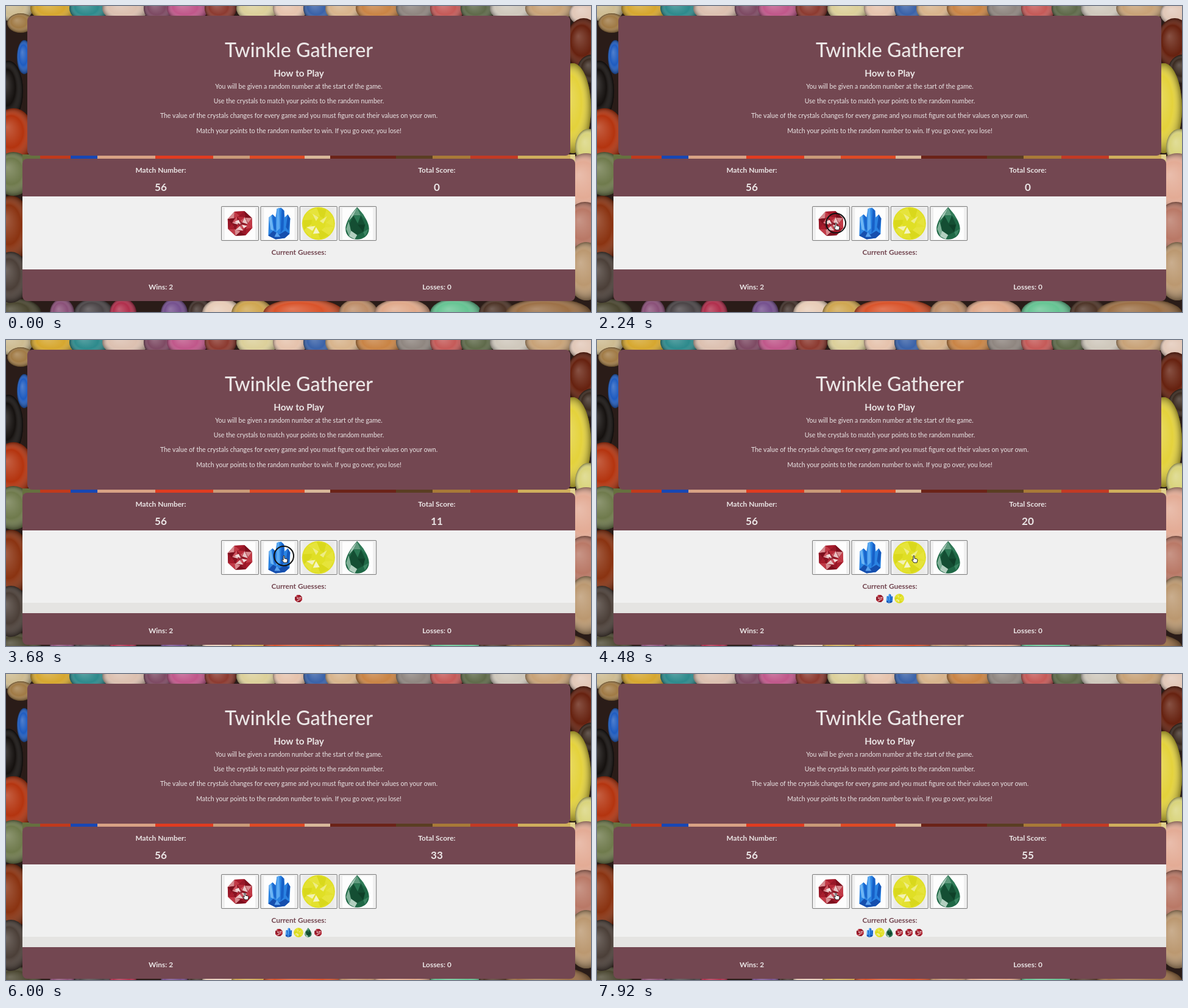
Animation, 960 px wide and 503 px high, one loop 8000 ms. Source, as an HTML page with a canvas:

```html
<!DOCTYPE html>
<html lang="en">
<head>
<meta charset="utf-8">
<title>Twinkle Gatherer</title>
<style>
html, body { margin: 0; width: 100%; height: 100%; overflow: hidden; background: #2a1c18; }
canvas { display: block; width: 960px; height: 503px; }
</style>
</head>
<body>
<canvas id="stage" width="960" height="503"></canvas>
<script>
const W = 960, H = 503, LOOP = 8000, STEP = 80;
const PLUM = '#734751', PALE = '#ebe6e6', PAPER = '#f0f0f0';
const canvas = document.getElementById('stage');
const ctx = canvas.getContext('2d');

// ---------- background of polished stones ----------
function stone(g, x, y, rx, ry, color) {
  g.save();
  g.translate(x, y);
  g.scale(rx, ry);
  g.beginPath();
  g.arc(0, 0, 1, 0, 7);
  g.fillStyle = color;
  g.fill();
  const shade = g.createRadialGradient(-0.3, -0.3, 0, 0, 0, 1);
  shade.addColorStop(0, 'rgba(255,255,255,.22)');
  shade.addColorStop(0.6, 'rgba(255,255,255,0)');
  shade.addColorStop(1, 'rgba(0,0,0,.4)');
  g.fillStyle = shade;
  g.fill();
  g.restore();
}

function makeBackdrop() {
  const c = document.createElement('canvas');
  c.width = W;
  c.height = H;
  const g = c.getContext('2d');
  g.fillStyle = '#2a1c18';
  g.fillRect(0, 0, W, H);

  const top = [
    [14, 30, '#cdbb91'], [78, 38, '#d6a72f'], [136, 32, '#2d8a8c'], [196, 38, '#dcc0b0'],
    [250, 24, '#7d4a63'], [298, 34, '#c0578a'], [352, 26, '#8c3a30'], [412, 34, '#dcd09a'],
    [466, 28, '#e6c3ad'], [512, 24, '#3a62a8'], [554, 30, '#d8b48c'], [612, 38, '#c98445'],
    [672, 32, '#8f8680'], [724, 28, '#c55a58'], [774, 28, '#5f6a4a'], [830, 36, '#cfc8bc'],
    [892, 40, '#c8a277']
  ];
  const bottom = [
    [18, 40, '#4a4630'], [92, 20, '#8a5078'], [144, 32, '#4a4446'], [192, 22, '#b02f4c'],
    [276, 22, '#75508e'], [318, 20, '#40302a'], [354, 32, '#e8cdb8'], [404, 34, '#cfa650'],
    [488, 66, '#d9532a'], [578, 32, '#bd8d68'], [650, 46, '#e0a98a'], [738, 42, '#66c493'],
    [806, 30, '#4d3427'], [890, 70, '#9c7046']
  ];
  top.forEach(([x, rx, color]) => stone(g, x, 4, rx, 22, color));
  bottom.forEach(([x, rx, color]) => stone(g, x, 505, rx, 24, color));

  // left edge
  stone(g, 24, 28, 22, 16, '#a07a45');
  stone(g, 30, 84, 12, 28, '#1f5cc0');
  stone(g, 4, 140, 24, 50, '#15110f');
  stone(g, 12, 212, 34, 44, '#b4340f');
  stone(g, 12, 276, 32, 36, '#6f7a4c');
  stone(g, 8, 366, 34, 54, '#8a3311');
  stone(g, 8, 446, 30, 42, '#4b3f38');

  // right edge
  stone(g, 950, 12, 26, 20, '#e2c8b8');
  stone(g, 948, 62, 30, 42, '#66210f');
  stone(g, 962, 104, 24, 24, '#3a2a20');
  stone(g, 930, 168, 30, 74, '#e4d23c');
  stone(g, 956, 232, 22, 30, '#d9d47c');
  stone(g, 952, 292, 40, 50, '#e3ab95');
  stone(g, 950, 364, 34, 42, '#b97866');
  stone(g, 952, 436, 32, 48, '#bb9870');

  // gap between the panels
  const gap = [
    [27, '#66703f'], [56, '#c03a1c'], [106, '#1747b4'], [150, '#d8a285'], [245, '#e03c20'],
    [340, '#c99a78'], [400, '#dd4a25'], [490, '#d8b89a'], [532, '#6b2318'], [640, '#5a3e22'],
    [700, '#a87a38'], [762, '#c23a24'], [840, '#cfae5c'], [926, '#e0cf8c']
  ];
  gap.forEach(([x, color], i) => {
    g.fillStyle = color;
    g.fillRect(x, 244, (gap[i + 1] || [934])[0] - x, 12);
  });
  return c;
}
const backdrop = makeBackdrop();

// ---------- drawing helpers ----------
function box(x, y, w, h, r, color) {
  ctx.beginPath();
  ctx.roundRect(x, y, w, h, r);
  ctx.fillStyle = color;
  ctx.fill();
}

function poly(color, ...p) {
  ctx.beginPath();
  for (let i = 0; i < p.length; i += 2) ctx.lineTo(p[i], p[i + 1]);
  ctx.closePath();
  ctx.fillStyle = color;
  ctx.fill();
}

function text(str, x, y, size, weight = 400, color = PALE) {
  ctx.font = `${weight} ${size}px Lato, "Open Sans", sans-serif`;
  ctx.fillStyle = color;
  ctx.textAlign = 'center';
  ctx.fillText(str, x, y);
}

// fan of facets between two rings
function facets(n, inner, outer, colors, turn = 0) {
  const at = (k, r) => {
    const a = turn + k * Math.PI * 2 / n;
    return [Math.cos(a) * r, Math.sin(a) * r];
  };
  for (let k = 0; k < n; k++) {
    poly(colors[k % colors.length], ...at(k, outer), ...at(k + 1, outer), ...at(k + 0.5, inner));
    poly(colors[(k + 2) % colors.length], ...at(k - 0.5, inner), ...at(k, outer), ...at(k + 0.5, inner));
  }
}

// ---------- the four gems, centred on 0,0 ----------
function ruby() {
  facets(8, 0, 21.5, ['#8f1524'], 0.35);
  facets(8, 13, 21.5, ['#a81c2c', '#7c0f1d', '#c23a47', '#981728', '#d78a8f'], 0.35);
  facets(6, 4, 13, ['#b82938', '#e9c3c4', '#8a1422', '#cf5661'], 0.1);
  poly('#f3dedd', -9, -3, -2, -6, 1, 1);
  poly('#f3dedd', 3, 2, 12, 4, 6, 8);
}

function azure() {
  poly('#2a83e2', -18, 20, -17, -10, -11, -15, -6, -10, -4, -24, 3, -26, 8, -21,
    9, -10, 14, -15, 18, -8, 17, 17, 9, 24, -6, 26);
  poly('#5aa9f2', -4, -24, 0, -26, 1, 8, -5, 14);
  poly('#1760c8', 4, -25, 8, -21, 7, 10, 2, 16);
  poly('#6db5f4', -17, -10, -13, -13, -9, 12, -14, 10);
  poly('#1a66cc', -11, -15, -6, -10, -5, 12, -9, 8);
  poly('#1558bb', 14, -15, 18, -8, 15, 12, 11, 6);
  poly('#164fae', -18, 20, -10, 12, 0, 18, 10, 12, 17, 17, 9, 24, -6, 26);
  poly('#58a2ee', -8, 22, -4, 14, 2, 22);
}

function citrine() {
  ctx.beginPath();
  ctx.arc(0, 0, 27, 0, 7);
  ctx.fillStyle = '#e0df25';
  ctx.fill();
  facets(10, 12, 26, ['#e6e43c', '#d9d81c', '#e3e130'], 0.2);
  poly('#f3f2b4', -20, 6, -5, 4, -10, 12);
  poly('#f5f4c4', -4, 6, 2, 16, -9, 17);
  poly('#eeec86', 2, -4, 14, -12, 8, 0);
  poly('#eeec86', -4, -4, -10, -16, 0, -10);
}

function emerald() {
  ctx.beginPath();
  ctx.moveTo(-1, -27);
  ctx.bezierCurveTo(5, -20, 19, -4, 18.5, 9);
  ctx.bezierCurveTo(18, 32, -20, 32, -20, 9);
  ctx.bezierCurveTo(-20, -4, -7, -20, -1, -27);
  ctx.fillStyle = '#1f6846';
  ctx.fill();
  poly('#a5c8b6', -1, -26, -7, -13, -15, -4, -10, -15);
  poly('#5f9a7d', -1, -26, -7, -13, 5, -13);
  poly('#2f7a57', -1, -26, 5, -13, 14, -5, 9, -15);
  poly('#7fb097', -19, 9, -15, -4, -11, 12, -14, 21);
  poly('#144e33', -7, -13, 5, -13, 12, 2, 9, 14, -1, 19, -11, 12, -13, 0);
  poly('#2b7854', -7, -13, 5, -13, 0, 0);
  poly('#0f4029', 12, 2, 9, 14, 0, 2);
  poly('#b3d0c0', -11, 12, -1, 19, -5, 26, -14, 21);
  poly('#3b8562', 9, 14, 18, 9, 12, 21);
}

const gems = [ruby, azure, citrine, emerald];

function gem(i, x, y, scale) {
  ctx.save();
  ctx.translate(x, y);
  ctx.scale(scale, scale);
  gems[i]();
  ctx.restore();
}

// ---------- game script ----------
// time, gem index, points
const clicks = [
  [2400, 0, 11], [3840, 1, 4], [4400, 2, 5], [5040, 3, 2],
  [5920, 0, 11], [6480, 0, 11], [7280, 0, 11]
];
// time, x, y
const path = [
  [0, 420, 512], [240, 420, 512], [880, 392, 358], [2560, 392, 357], [3280, 456, 355],
  [3920, 456, 355], [4160, 520, 355], [4480, 520, 355], [4720, 601, 355],
  [5360, 601, 355], [5760, 392, 360], [8000, 392, 360]
];

function pointerAt(t) {
  let i = 1;
  while (i < path.length - 1 && path[i][0] < t) i++;
  const [t0, x0, y0] = path[i - 1], [t1, x1, y1] = path[i];
  const k = (t - t0) / (t1 - t0);
  const e = k * k * (3 - 2 * k);
  return [x0 + (x1 - x0) * e, y0 + (y1 - y0) * e];
}

const ARROW = new Path2D('M0 0V11L2.6 8.7L4.3 12.4L6 11.6L4.4 8.1H7.6Z');
const HAND = new Path2D('M-1 0Q0-1 1 0V4L5 5Q6 5.3 6 7L5 11H0L-3.4 6.6Q-3-1 5.2-1 7V0Z'.replace('Q-3-1 5.2-1 7', 'Q-3 5.2 -1 7'));

function drawPointer(x, y) {
  const over = x > 353 && x < 608 && y > 329 && y < 386;
  const shape = over ? HAND : ARROW;
  ctx.save();
  ctx.translate(x, y);
  ctx.lineWidth = 1;
  ctx.lineJoin = 'round';
  ctx.fillStyle = over ? '#fff' : '#111';
  ctx.strokeStyle = over ? '#222' : '#fff';
  ctx.fill(shape);
  ctx.stroke(shape);
  ctx.restore();
}

function drawPulse(t, x, y) {
  for (const [when] of clicks) {
    const age = (t - when + 320) / 320;
    if (age < 0 || age >= 1) continue;
    ctx.beginPath();
    ctx.arc(x, y, 12 + 8 * age, 0, 7);
    ctx.globalAlpha = age > 0.7 ? 0.5 : 1;
    ctx.lineWidth = 2;
    ctx.strokeStyle = '#111';
    ctx.stroke();
    ctx.globalAlpha = 1;
  }
}

// ---------- scene ----------
function drawIntro() {
  box(35, 16, 891, 230, 8, PLUM);
  text('Twinkle Gatherer', 480.5, 84, 32.2, 500);
  text('How to Play', 480.5, 115.5, 15.2, 700);
  [
    'You will be given a random number at the start of the game.',
    'Use the crystals to match your points to the random number.',
    'The value of the crystals changes for every game and you must figure out their values on your own.',
    'Match your points to the random number to win. If you go over, you lose!'
  ].forEach((line, i) => text(line, 480.5, 136 + i * 24.2, 10.5));
}

function drawButtons() {
  for (let i = 0; i < 4; i++) {
    const x = 353 + i * 64.4;
    box(x, 329, 62, 57, 2, '#7b7b7b');
    box(x + 1, 330, 60, 55, 1, '#efefef');
    ctx.fillStyle = i === 2 ? '#ebebea' : '#fdfdfd';
    ctx.fillRect(x + 6, 332, 50, 52);
    gem(i, x + 31, 357.5, 1);
  }
}

function drawGame(t) {
  const done = clicks.filter(c => c[0] <= t);
  const score = done.reduce((sum, c) => sum + c[2], 0);
  const drop = done.length ? 16 : 0;

  box(27, 251, 907, 234 + drop, 8, PLUM);
  ctx.fillStyle = PAPER;
  ctx.fillRect(27, 313, 907, 120 + drop);
  if (drop) {
    ctx.fillStyle = '#e5e4e2';
    ctx.fillRect(27, 432, 907, 17);
  }

  text('Match Number:', 254, 273.5, 11.9, 700);
  text('Total Score:', 707, 273.5, 11.9, 700);
  text('56', 254, 304, 17.2, 700);
  text(score, 707, 304, 17.2, 700);

  drawButtons();
  text('Current Guesses:', 480.5, 409, 11.9, 700, PLUM);
  done.forEach((c, i) => gem(c[1], 480 + (i - (done.length - 1) / 2) * 16.1, 425, 0.29));

  text('Wins: 2', 254, 466 + drop, 11.9, 700);
  text('Losses: 0', 707, 466 + drop, 11.9, 700);
}

function render(t) {
  ctx.drawImage(backdrop, 0, 0);
  drawIntro();
  drawGame(t);
  const [x, y] = pointerAt(t);
  drawPulse(t, x, y);
  drawPointer(x, y);
}

const start = performance.now();
function tick() {
  const t = Math.max(0, performance.now() - start) % LOOP;
  render(Math.floor(t / STEP) * STEP);
  requestAnimationFrame(tick);
}
tick();
</script>
</body>
</html>
```
